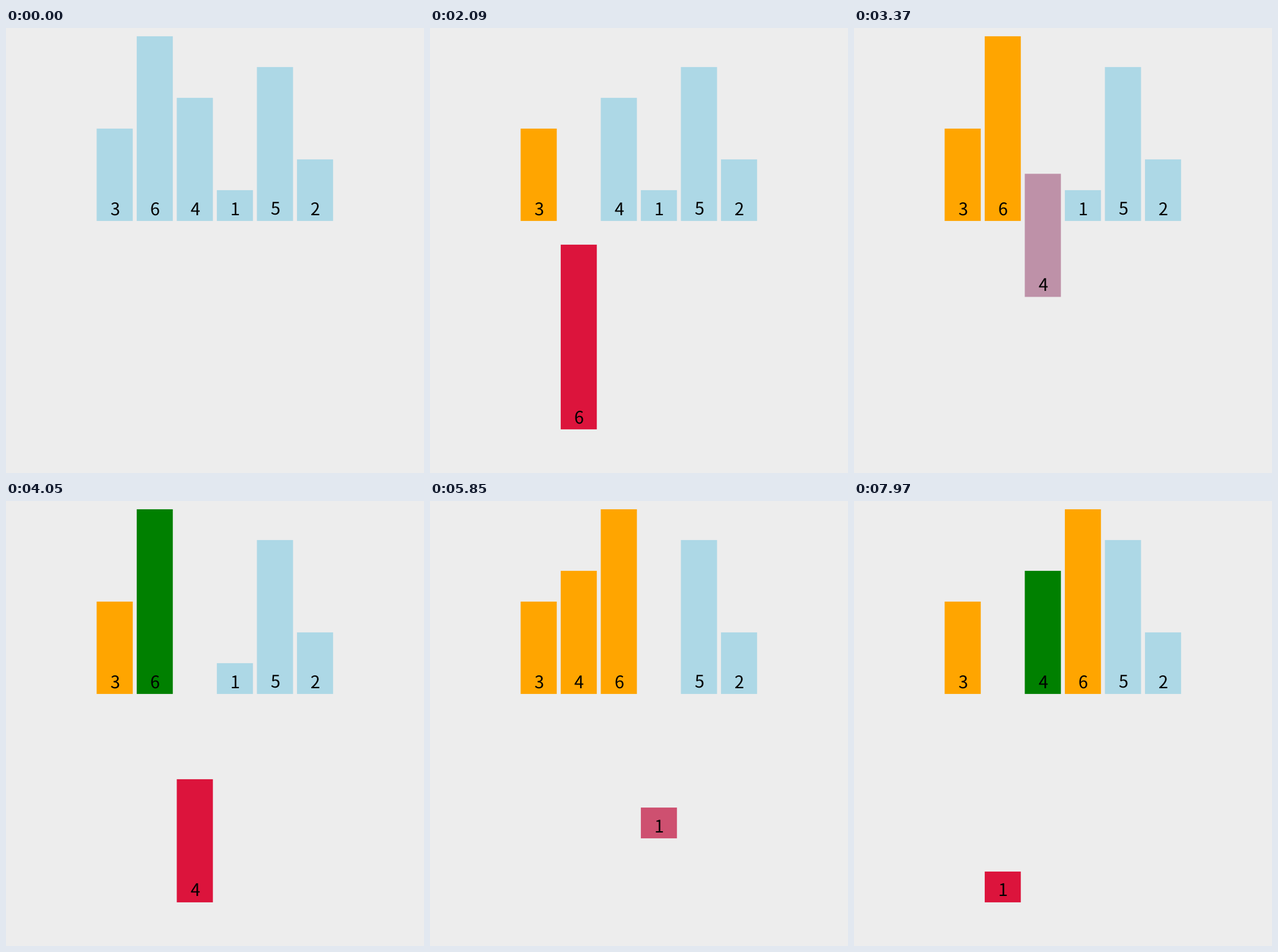
Recreate the animation shown at these times as a matplotlib script. Size 652 by 694 pixels, loop 8000 ms.

```python
import matplotlib.pyplot as plt
import numpy as np
from matplotlib.animation import FuncAnimation
from matplotlib.colors import to_rgb
from matplotlib.patches import Polygon, Rectangle

W, H, DPI = 652, 694, 64
LOOP, INTERVAL = 8000, 20
BASE, DROP, UNIT = 300.9, 325, 48
LEFT, PITCH, BAR_W = 141.4, 62.5, 56.3
BEGIN, STEP, TWEEN = 1306, 491, 200  # ms

VALUES = [3, 6, 4, 1, 5, 2]
ARROW = np.array([(.5, .5), (.5, 16.5), (4.2, 12.9), (6.7, 18.4),
                  (8.8, 17.5), (6.4, 11.8), (11.4, 11.5)])

plt.rcParams["text.hinting"] = "none"


def sort_states():
    """Insertion sort; one array of (slot, lowered, r, g, b) rows per step."""
    now = np.array([(i, 0, *to_rgb("lightblue")) for i in range(len(VALUES))])
    states = [now.copy()]
    order = list(range(len(VALUES)))

    def paint(bar, color):
        now[bar, 2:] = to_rgb(color)

    def save():
        states.append(now.copy())

    paint(0, "orange")
    save()
    for key in range(1, len(VALUES)):
        paint(key, "crimson")
        now[key, 1] = 1
        save()
        other = None
        for j in range(key - 1, -1, -1):
            if other is not None:
                paint(other, "orange")
            other = order[j]
            paint(other, "green")
            save()
            if VALUES[other] < VALUES[key]:
                break
            order[j], order[j + 1] = key, other
            now[[key, other], 0] = j, j + 1
            save()
        paint(other, "orange")
        paint(key, "orange")
        now[key, 1] = 0
        save()
    return states


def ease(t):
    t = min(max(t, 0), 1)
    return 4 * t ** 3 if t < .5 else 1 - 4 * (1 - t) ** 3


STATES = sort_states()

fig = plt.figure(figsize=(W / DPI, H / DPI), dpi=DPI, facecolor="#ededed")
ax = fig.add_axes([0, 0, 1, 1])
ax.set_xlim(0, W)
ax.set_ylim(H, 0)
ax.axis("off")

bars, labels = [], []
for v in VALUES:
    bars.append(ax.add_patch(Rectangle((0, 0), BAR_W, UNIT * v, lw=0, snap=False)))
    labels.append(ax.text(0, 0, str(v), ha="center", va="baseline", zorder=3,
                          family="Noto Sans CJK JP", fontsize=27 * 72 / DPI))
pointer = ax.add_patch(Polygon(ARROW, facecolor="white", edgecolor="black",
                               lw=72 / DPI, zorder=4))


def draw(n):
    now = n * INTERVAL
    step, since = divmod(max(now - BEGIN, 0), STEP)
    k = ease(since / TWEEN)
    rows = STATES[step] * (1 - k) + STATES[step + 1] * k
    for v, bar, label, (slot, low, *color) in zip(VALUES, bars, labels, rows):
        x, foot = LEFT + PITCH * slot, BASE + DROP * low
        bar.set_xy((x, foot - UNIT * v))
        bar.set_facecolor(np.clip(color, 0, 1))
        label.set_position((x + BAR_W / 2, foot - 9.4))

    # The mouse passes quickly up through the lower half
    pointer.set_visible(6720 <= now < 7300)
    times = [6720, 6860, 7000, 7160]
    tip = (np.interp(now, times, [371, 366, 365, 355]),
           np.interp(now, times, [644, 580, 567, 554]))
    pointer.set_xy(ARROW + tip)
    return [*bars, *labels, pointer]


anim = FuncAnimation(fig, draw, frames=LOOP // INTERVAL, interval=INTERVAL,
                     repeat=True, repeat_delay=0)
plt.show()
```
